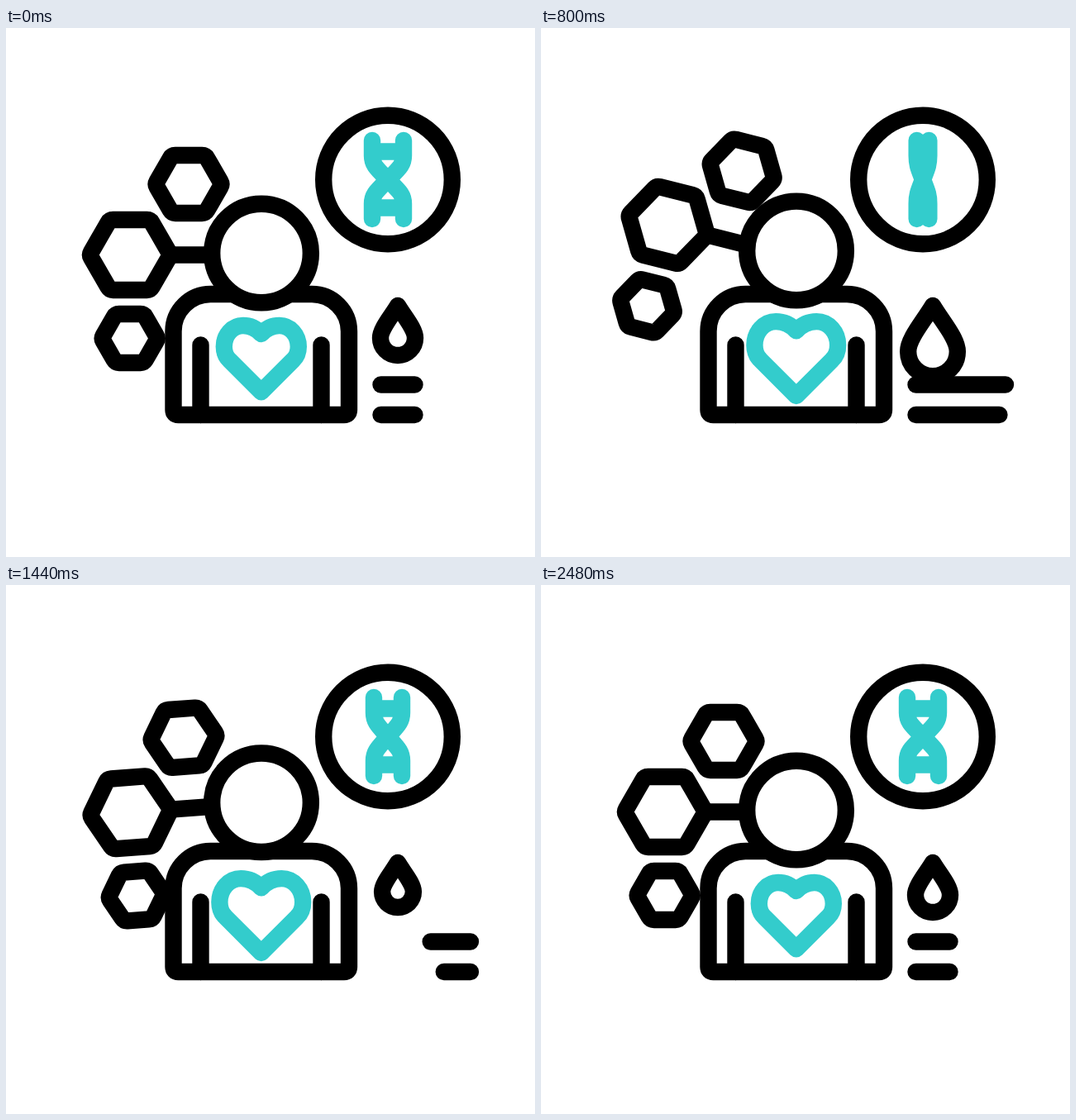
Write an HTML page that moves like this. It is 640 px wide and 640 px high and loops after 2600 ms.

```html
<!DOCTYPE html>
<html lang="en">
<head>
<meta charset="utf-8">
<title>Health icon</title>
<style>
  html, body { margin: 0; width: 100%; height: 100%; overflow: hidden; background: #fff; }
  svg { display: block; width: 100%; height: 100%; }
  svg * { fill: none; stroke: #000; stroke-width: 20.4; stroke-linecap: round; stroke-linejoin: round; }
  svg .accent { stroke: #3cc; }
  svg .solid { fill: #fff; }
</style>
</head>
<body>
<svg viewBox="0 0 640 640">
  <g id="molecule">
    <path id="hexagons"/>
    <path d="M199 274.5H250"/>
  </g>
  <path d="M248 322H370A45 45 0 0 1 415 367V462Q415 468 409 468H208.500Q202.500 468 202.500 462V367A45 45 0 0 1 248 322Z"/>
  <path d="M235.500 383.500V468M381.500 383.500V468"/>
  <circle id="head" class="solid" cx="309" cy="272.500" r="59.800"/>
  <path id="heart" class="accent"/>
  <circle cx="462" cy="183.500" r="77.800"/>
  <path id="dna" class="accent"/>
  <path id="drop"/>
  <path id="bars"/>
</svg>
<script>
  const LOOP = 2600, STEP = 40, START = 200;
  const set = (id, name, value) => document.getElementById(id).setAttribute(name, value);

  // Smooth progress from 0 to 1 between two times.
  function ease(t, from, to) {
    const p = Math.min(1, Math.max(0, (t - from) / (to - from)));
    return p * p * (3 - 2 * p);
  }

  // Swings out, four times from side to side, and back to rest in equal beats.
  function swing(t, size, beat) {
    let value = -size * ease(t, START, START + beat);
    for (let i = 1; i < 5; i++) {
      const travel = i < 4 ? 2 * size : size;
      value += (i % 2 ? travel : -travel) * ease(t, START + i * beat, START + (i + 1) * beat);
    }
    return value;
  }

  function pulse(t) {
    const strength = ease(t, START, 390) - ease(t, 2150, 2480);
    return 1 + strength * (-.05 - .17 * Math.cos((t - 465) / 650 * 2 * Math.PI));
  }

  function hexagon(cx, cy, r) {
    const corner = i => [cx + r * Math.cos(i * Math.PI / 3), cy + r * Math.sin(i * Math.PI / 3)];
    const toward = (a, b) => a.map((n, k) => n + (b[k] - n) * 4 / r);
    let d = '';
    for (let i = 0; i < 6; i++) {
      const c = corner(i);
      d += `${i ? 'L' : 'M'}${toward(c, corner(i - 1))}Q${c} ${toward(c, corner(i + 1))}`;
    }
    return d + 'Z';
  }

  // Scales a path's coordinates about an anchor, leaving the line weight alone.
  function scaled(path, cx, cy, sx, sy) {
    let i = 0;
    return path.replace(/-?[\d.]+/g, n => i++ % 2 ? cy + n * sy : cx + n * sx);
  }

  // A bar stretches right, pulls its left end after it, then returns.
  function bar(t, y, lag, back) {
    const s = t - lag;
    const left = 453.5 + 76.5 * (ease(s, 800, 1300) - ease(s, 1300, 1770));
    const right = 494.5 + 67.5 * (ease(s, START, 800) - ease(t, back, 2480));
    return `M${left} ${y}H${right}`;
  }

  const HEART = 'M0 -30.5C-6 -37 -14 -40.5 -22 -40.5C-35 -40.5 -45 -29 -45 -15' +
    'C-45 -8 -42.5 -2.5 -38.5 1.2L0 39.7L38.5 1.2C42.5 -2.5 45 -8 45 -15' +
    'C45 -29 35 -40.5 22 -40.5C14 -40.5 6 -37 0 -30.5Z';
  const DROP = 'M0 0C-8 13.5 -21 28 -21 39C-21 50.6 -11.6 60 0 60' +
    'C11.6 60 21 50.6 21 39C21 28 8 13.5 0 0Z';
  const STRAND = 'M-19 -47.5L-19 -29C-19 -18 -14 -14 0 0C14 14 19 18 19 29L19 47.5';
  const RUNGS = 'M-19 -34L19 -34M-19 34L19 34';

  set('hexagons', 'd', hexagon(150, 274.5, 49) + hexagon(221, 189, 40.4) + hexagon(149.7, 375.5, 34));

  function draw(t) {
    const bob = swing(t, 10, 430);
    const turn = 14.2 * ease(t, 240, 770) - 19.2 * ease(t, 770, 1530) + 5 * ease(t, 1960, 2460);
    const beat = pulse(t);
    const twist = 1 - 2 * ease(t, START, 1150) + 2 * ease(t, 1300, 2310);
    const swell = 1 + .42 * ease(t, START, 720) - .57 * ease(t, 1080, 1520) + .15 * ease(t, 1520, 2440);

    set('head', 'transform', `translate(0 ${bob})`);
    set('molecule', 'transform', `translate(0 ${bob}) rotate(${turn} 285 272)`);
    set('heart', 'd', scaled(HEART, 308.8, 400.5, beat, beat));
    set('dna', 'd', scaled(STRAND, 462, 183.5, twist, 1) +
      scaled(STRAND, 462, 183.5, -twist, 1) + scaled(RUNGS, 462, 183.5, twist, 1));
    set('drop', 'd', scaled(DROP, 474, 336, swell, swell));
    set('bars', 'd', bar(t, 431.5, 0, 1430) + bar(t, 468, 125, 1785));
  }

  function tick() {
    const t = performance.now() % LOOP;
    draw(Math.floor(t / STEP) * STEP);
    requestAnimationFrame(tick);
  }
  tick();
</script>
</body>
</html>
```
